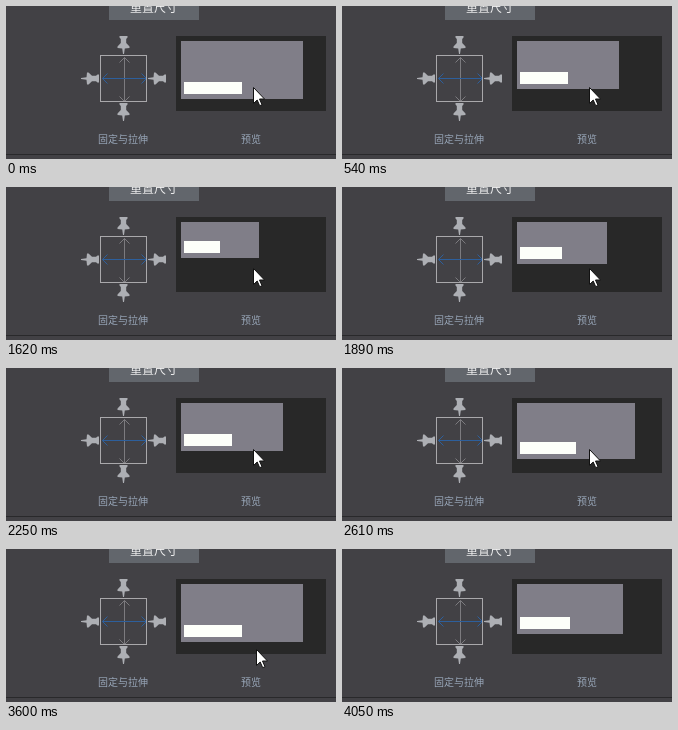
An HTML page with a canvas that plays this animation: 330 px wide and 153 px high, repeating every 4.13 s.

```html
<!DOCTYPE html>
<html lang="zh">
<head>
<meta charset="utf-8">
<title>预览</title>
<style>
  html, body { margin: 0; width: 100%; height: 100%; overflow: hidden; background: #424145; }
  canvas { display: block; width: 330px; height: 153px; }
</style>
</head>
<body>
<canvas id="stage" width="330" height="153"></canvas>
<script>
const ctx = document.getElementById('stage').getContext('2d');
const LOOP = 4130, TICK = 90;
const PAUSES = [3, 9, 17, 24, 31, 37, 43];
const FONT = '"Noto Sans CJK SC", "Noto Sans CJK", sans-serif';

function box(x, y, w, h, color) {
  ctx.fillStyle = color;
  ctx.fillRect(x, y, w, h);
}

function label(text, x, y, size, color) {
  ctx.font = `${size}px ${FONT}`;
  ctx.textAlign = 'center';
  ctx.fillStyle = color;
  ctx.fillText(text, x, y);
}

function trace(points, close) {
  ctx.beginPath();
  points.forEach(([x, y]) => ctx.lineTo(x, y));
  if (close) ctx.closePath();
}

function at(x, y, angle, paint) {
  ctx.save();
  ctx.translate(x, y);
  ctx.rotate(angle);
  paint();
  ctx.restore();
}

function doubleArrow(color) {
  ctx.strokeStyle = color;
  trace([[0, -22], [0, 22]]);
  ctx.stroke();
  for (const s of [-1, 1]) {
    trace([[-5, 17 * s], [0, 22 * s], [5, 17 * s]]);
    ctx.stroke();
  }
}

// Head on top, needle pointing down.
function pin() {
  const right = [[4, -9], [4, -7.5], [2.7, -6], [2.7, -2], [6, 1.5], [6, 3], [1.3, 3.5], [0.5, 9]];
  const left = right.map(([x, y]) => [-x, y]).reverse();
  trace([...right, ...left], true);
  ctx.fillStyle = '#adafb4';
  ctx.fill();
}

function drawAnchors() {
  const quarter = Math.PI / 2;
  ctx.lineWidth = 1;
  at(118.5, 73.5, 0, () => doubleArrow('#7c7b7f'));
  at(118.5, 72.5, quarter, () => doubleArrow('#2d5f9c'));
  ctx.strokeStyle = '#a9a8ab';
  ctx.strokeRect(94.5, 49.5, 46, 46);
  for (const s of [-1, 1]) {
    at(117.5, 72.5 + 33.5 * s, 0, pin);
    at(117.5 + 33.5 * s, 72.5, quarter, pin);
  }
}

function drawCursor(x, y) {
  at(x + 0.5, y + 0.5, 0, () => {
    trace([[0, 0], [0, 16], [3.7, 12.5], [6.2, 18.2], [8.5, 17.2], [6, 11.5], [11, 11.5]], true);
    ctx.fillStyle = '#fff';
    ctx.fill();
    ctx.strokeStyle = '#111';
    ctx.lineWidth = 1;
    ctx.stroke();
  });
}

// Shrinks for 13 steps, grows for 17, then shrinks again.
function panelWidth(tick) {
  const n = tick - PAUSES.filter(p => p <= tick).length;
  return n <= 30 ? 70 + 4 * Math.abs(n - 13) : 138 - 4 * (n - 30);
}

function drawPreview(tick) {
  box(170, 30, 150, 75, '#282828');
  const w = panelWidth(tick), h = w / 2 - 3;
  box(175, 35, w, h, '#807e88');
  box(178, 35 + h - 17, h, 12, '#fdfffa');
}

// The pointer rests, then accelerates off the lower edge.
function pointer(tick) {
  const s = Math.max(0, tick - 38);
  return [247 + Math.round(1.5 * s), 81 + Math.round(4 * s + 2.75 * s * s)];
}

function draw(now) {
  const tick = Math.min(45, Math.floor((now % LOOP) / TICK));
  box(0, 0, 330, 153, '#424145');
  box(0, 148, 330, 1, '#29292b');
  box(103, 0, 90, 14, '#62666c');
  label('重置尺寸', 148, 6, 12, '#f1f1f1');
  drawAnchors();
  label('固定与拉伸', 117, 137, 10, '#98a6b8');
  label('预览', 245, 137, 10, '#98a6b8');
  drawPreview(tick);
  if (tick < 43) drawCursor(...pointer(tick));
}

const start = performance.now();
function loop() {
  draw(performance.now() - start);
  requestAnimationFrame(loop);
}
loop();
</script>
</body>
</html>
```
